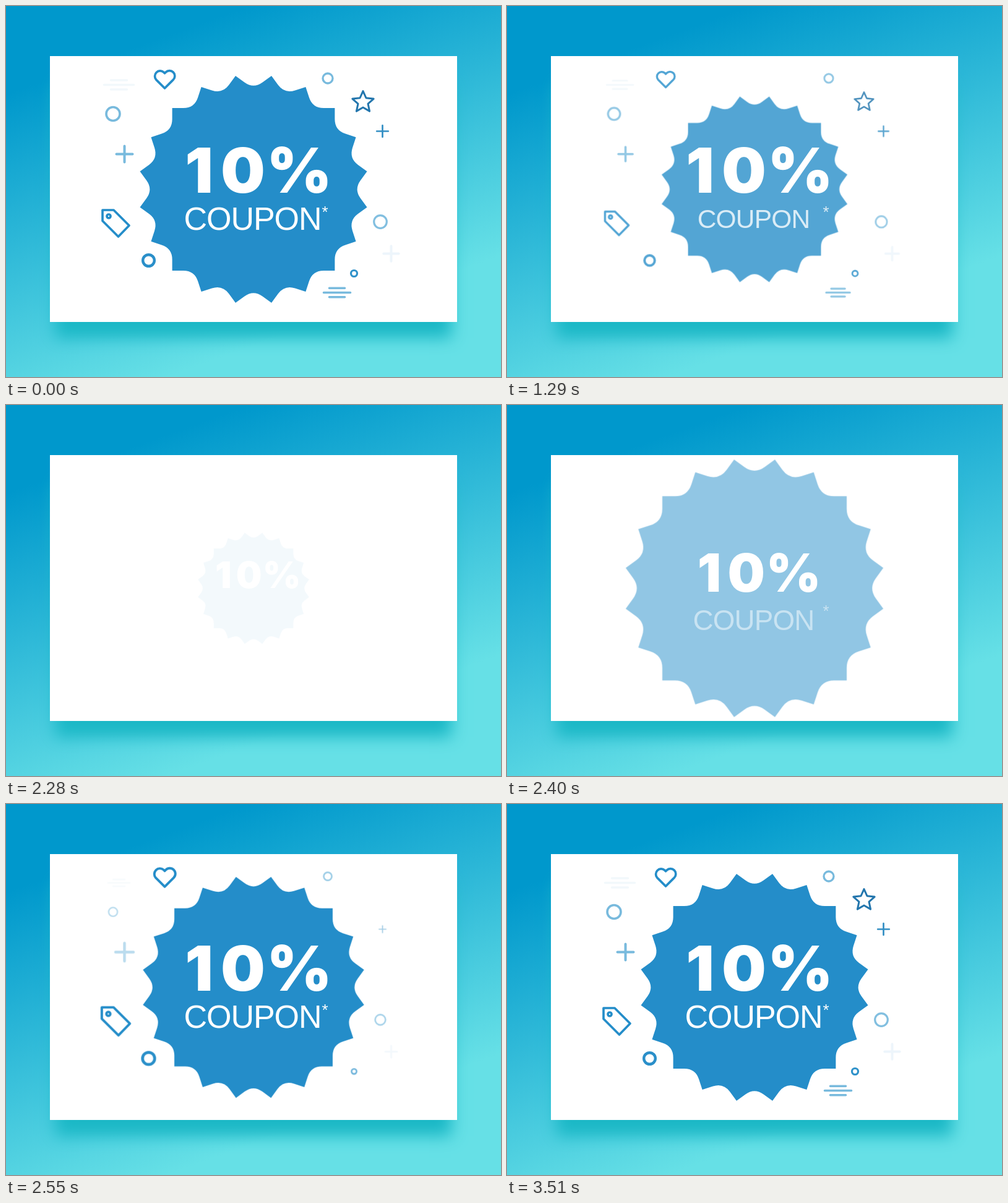
These frames come from a looping animation (800x600 px, 3.9 s). An HTML page:

```html
<!DOCTYPE html>
<html lang="en">
<head>
<meta charset="utf-8">
<title>10% coupon</title>
<style>
  html, body { margin: 0; width: 100%; height: 100%; overflow: hidden; }
  body { position: relative; background: linear-gradient(160deg, #0098cc 16%, #66e0e6 78%); }
  .card {
    position: absolute; left: 71px; top: 81px; width: 658px; height: 430px;
    background: #fff; box-shadow: 0 35px 24px -9px #1bb8c6;
  }
  svg { position: absolute; left: 0; top: 0; width: 800px; height: 600px; }

  /* Every animation shares one 3.9 s loop */
  #badge, .big, .small, .star, .out, .in { animation: 3900ms linear infinite; }

  #badge { fill: #248dc9; transform-origin: 400px 296.5px; animation-name: badge, fade; }
  text { fill: #fff; text-anchor: middle; }
  .big {
    font: 900 101px Inter, "Liberation Sans", sans-serif;
    transform-origin: 406px 266px; animation-name: big;
  }
  .small, .star { font-family: "Liberation Sans", Arial, sans-serif; }
  .small {
    font-size: 52px; letter-spacing: -1px;
    transform-origin: 398.5px 344px; animation-name: small, fade;
  }
  .star { font-size: 26px; animation-name: fade; }

  .out, .in { transform-box: fill-box; transform-origin: center; }
  .out { animation-name: leave; }
  .in {
    fill: none; stroke-linecap: round; stroke-linejoin: round;
    animation-name: pop, appear; animation-delay: calc(var(--at) - 3900ms);
  }
  .slow { animation-name: pop, appear-slow; }

  @keyframes badge {
    0%, 31.15% { scale: 1; }
    33.08% { scale: .82; }
    40%, 58.45% { scale: .145; }
    58.46% { scale: .48; animation-timing-function: cubic-bezier(.25, .4, .55, 1); }
    61.4% { scale: 1.135; animation-timing-function: ease-in-out; }
    65% { scale: .973; animation-timing-function: ease-in-out; }
    68.6% { scale: 1.006; animation-timing-function: ease-in-out; }
    72.2%, 100% { scale: 1; }
  }
  @keyframes fade {
    0%, 31.1% { opacity: 1; }
    33.08% { opacity: .79; }
    40%, 58.45% { opacity: .04; }
    58.46% { opacity: .05; }
    61.54% { opacity: .5; }
    65%, 100% { opacity: 1; }
  }
  @keyframes big {
    0%, 58.45% { transform: none; }
    58.46% { transform: translateY(9.5px) scale(.58); }
    61.54% { transform: translateY(6px) scale(.84); animation-timing-function: ease-out; }
    65.4%, 100% { transform: none; }
  }
  @keyframes small {
    0%, 31.15% { transform: none; }
    33.08% { transform: scale(.82); }
    40%, 58.45% { transform: scale(.145); }
    58.46% { transform: translateY(8px) scale(.6); }
    61.54% { transform: translateY(4px) scale(.88); animation-timing-function: ease-out; }
    65.4%, 100% { transform: none; }
  }
  @keyframes leave {
    0%, 31.3% { scale: 1; opacity: 1; }
    33.08% { scale: .89; opacity: .8; }
    40%, 58.45% { scale: .4; opacity: .03; }
    58.46%, 61.54% { scale: 1; opacity: 0; }
    61.55%, 100% { scale: 1; opacity: 1; }
  }
  /* Icon entrances, counted from each icon's own start */
  @keyframes pop {
    0% { scale: .4; animation-timing-function: cubic-bezier(.37, 0, .63, 1); }
    3.6% { scale: 1.13; animation-timing-function: ease-in-out; }
    7.2% { scale: .97; animation-timing-function: ease-in-out; }
    10.8% { scale: 1.006; animation-timing-function: ease-in-out; }
    14%, 100% { scale: 1; }
  }
  @keyframes appear {
    0% { opacity: 0; }
    2.8%, 95% { opacity: 1; }
    95.01%, 100% { opacity: 0; }
  }
  @keyframes appear-slow {
    0% { opacity: 0; }
    6.4%, 95% { opacity: 1; }
    95.01%, 100% { opacity: 0; }
  }
</style>
</head>
<body>
<div class="card"></div>
<svg viewBox="0 0 800 600">
  <g id="icons"></g>
  <path id="badge"/>
  <text class="big" x="312 383 474" y="302">10%</text>
  <text class="small" x="398.5" y="362">COUPON</text>
  <text class="star" x="515.5" y="342">*</text>
</svg>
<script>
  const BLUE = '#248dc9', PALE = '#78badd';

  // Badge: 20 right-angled tips joined by rounded valleys
  function badgePath(cx, cy, r) {
    const polar = (deg, rad) => {
      const a = deg * Math.PI / 180;
      return [cx + rad * Math.cos(a), cy + rad * Math.sin(a)];
    };
    const mid = (p, q) => [(p[0] + q[0]) / 2, (p[1] + q[1]) / 2];
    let d = '';
    for (let k = 0; k < 20; k++) {
      const a = 9 + k * 18;
      const tip = polar(a, r), valley = polar(a + 9, r * .874), next = polar(a + 18, r);
      d += `${k ? 'L' : 'M'}${tip} L${mid(tip, valley)} Q${valley} ${mid(valley, next)}`;
    }
    return d + 'Z';
  }
  document.getElementById('badge').setAttribute('d', badgePath(400, 296.5, 185.8));

  const ring = (x, y, r) =>
    `M${x - r} ${y}a${r} ${r} 0 1 1 ${2 * r} 0a${r} ${r} 0 1 1 ${-2 * r} 0Z`;
  const plus = (x, y, r) => `M${x - r} ${y}h${2 * r}M${x} ${y - r}v${2 * r}`;
  const bars = (x, y, gap, long, short) =>
    `M${x - short} ${y - gap}h${2 * short}M${x - long} ${y}h${2 * long}M${x - short} ${y + gap}h${2 * short}`;

  function star(x, y, r) {
    const pts = [];
    for (let i = 0; i < 10; i++) {
      const a = i * Math.PI / 5, rad = i % 2 ? r * .47 : r;
      pts.push([x + rad * Math.sin(a), y - rad * Math.cos(a)]);
    }
    return 'M' + pts.join('L') + 'Z';
  }

  const heart = 'M270.3 107.1a8.6 8.6 0 0 0-12.14 0l-1.66 1.65-1.65-1.65a8.6 8.6 0 0 0-12.14 12.14' +
    'l1.65 1.65 12.14 12.14 12.14-12.14 1.66-1.65a8.6 8.6 0 0 0 0-12.14z';
  const tag = 'M156 330H174L199 355L181.5 373L156 347.5Z' + ring(166, 340, 3);

  // path, colour, line width, start in ms, slow fade
  const icons = [
    [heart, BLUE, 3.7, 2440],
    [tag, BLUE, 3.7, 2440],
    [star(577, 155.6, 18), '#2376ad', 3, 2555],
    [ring(173, 174.5, 11), PALE, 3.6, 2495],
    [ring(520, 117, 8), PALE, 3.3, 2475],
    [ring(605, 349, 10.3), '#82bfe0', 3.2, 2475],
    [ring(230.5, 411.5, 9.3), '#2a8fc9', 4.4, 2440],
    [ring(562.5, 432.5, 5), '#2f92ca', 3.2, 2475],
    [plus(191.5, 239.5, 13), PALE, 4, 2425, true],
    [plus(608.5, 202.5, 9.3), '#338fc4', 2.7, 2500],
    [plus(622.5, 400.5, 12.2), '#edf5fb', 4, 2480],
    [bars(182.5, 127.5, 7.5, 24, 13), '#f2f8fb', 3.5, 2485],
    [bars(535, 463.5, 7.2, 21.5, 12.5), PALE, 3.6, 2560]
  ];
  document.getElementById('icons').innerHTML = icons.map(([d, color, width, at, slow]) =>
    `<g class="out"><path class="in${slow ? ' slow' : ''}" d="${d}" stroke="${color}" ` +
    `stroke-width="${width}" style="--at:${at}ms"/></g>`).join('');
</script>
</body>
</html>
```
